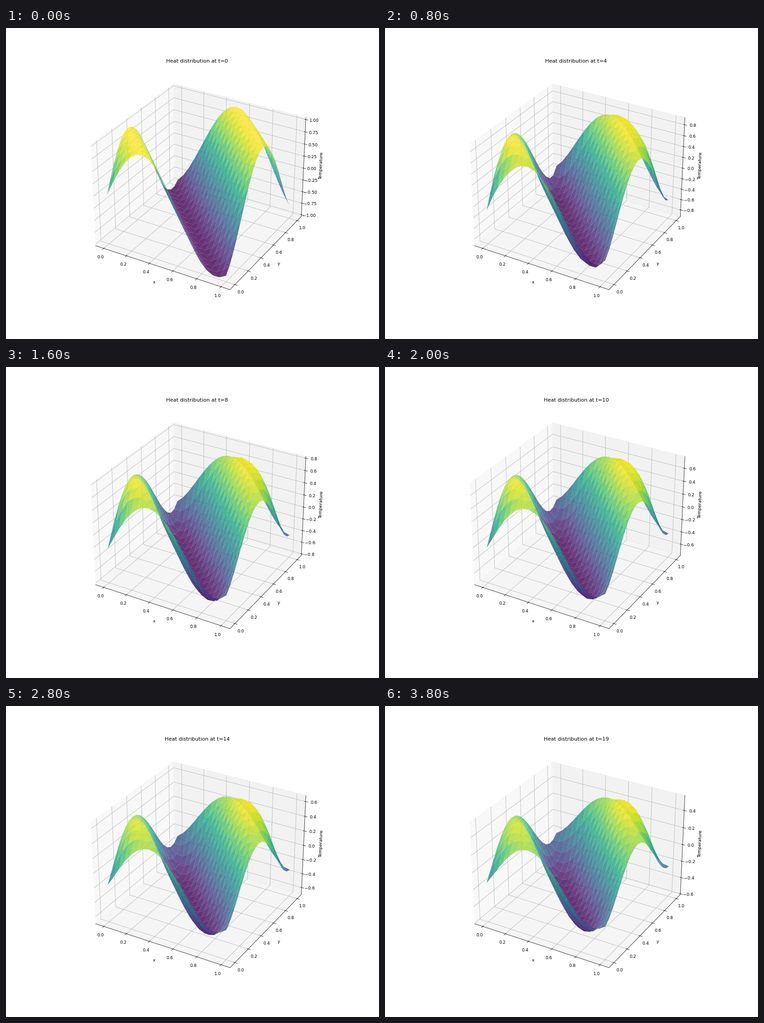
Write a matplotlib script that moves like this. It is 820 px wide and 683 px high and loops after 4000 ms.

```python
import numpy as np
import matplotlib.pyplot as plt
from matplotlib.animation import FuncAnimation

WIDTH, HEIGHT = 820, 683
DPI = WIDTH / 12
N = 20            # grid points per side
STEPS = 20
ALPHA = 0.01      # diffusivity
WAVE = 5.14       # wave number of the starting field

axis = np.linspace(0, 1, N)
X, Y = np.meshgrid(axis, axis)
dx = axis[1]
dt = 1 / (STEPS - 1)


def diffuse(u):
    """One explicit heat step on a periodic grid."""
    around = sum(np.roll(u, shift, ax) for shift in (1, -1) for ax in (0, 1))
    return u + ALPHA * dt / dx**2 * (around - 4 * u)


fields = [np.sin(WAVE * (X + Y))]
while len(fields) < STEPS:
    fields.append(diffuse(fields[-1]))


def padded(low, high, margin=0.0):
    """Limits with a relative margin plus the usual 3D view padding."""
    extra = margin * (high - low)
    low, high = low - extra, high + extra
    pad = (high - low) / 48
    return low - pad, high + pad


# The tiny extra keeps the pixel size from rounding down.
fig = plt.figure(figsize=((WIDTH + 1e-6) / DPI, (HEIGHT + 1e-6) / DPI), dpi=DPI)
ax = fig.add_subplot(111, projection="3d")


def draw(step):
    u = fields[step]
    ax.clear()
    ax.plot_surface(X, Y, u, cmap="viridis", alpha=0.8, linewidth=0)
    ax.set_xlim(*padded(0, 1, 0.05))
    ax.set_ylim(*padded(0, 1, 0.05))
    ax.set_zlim(*padded(u.min(), u.max()))
    ax.set_xlabel("x")
    ax.set_ylabel("y")
    ax.set_zlabel("Temperature")
    ax.set_title(f"Heat distribution at t={step}")
    return []


anim = FuncAnimation(fig, draw, frames=STEPS, init_func=lambda: draw(0),
                     interval=200, repeat=True, repeat_delay=0)
plt.show()
```
